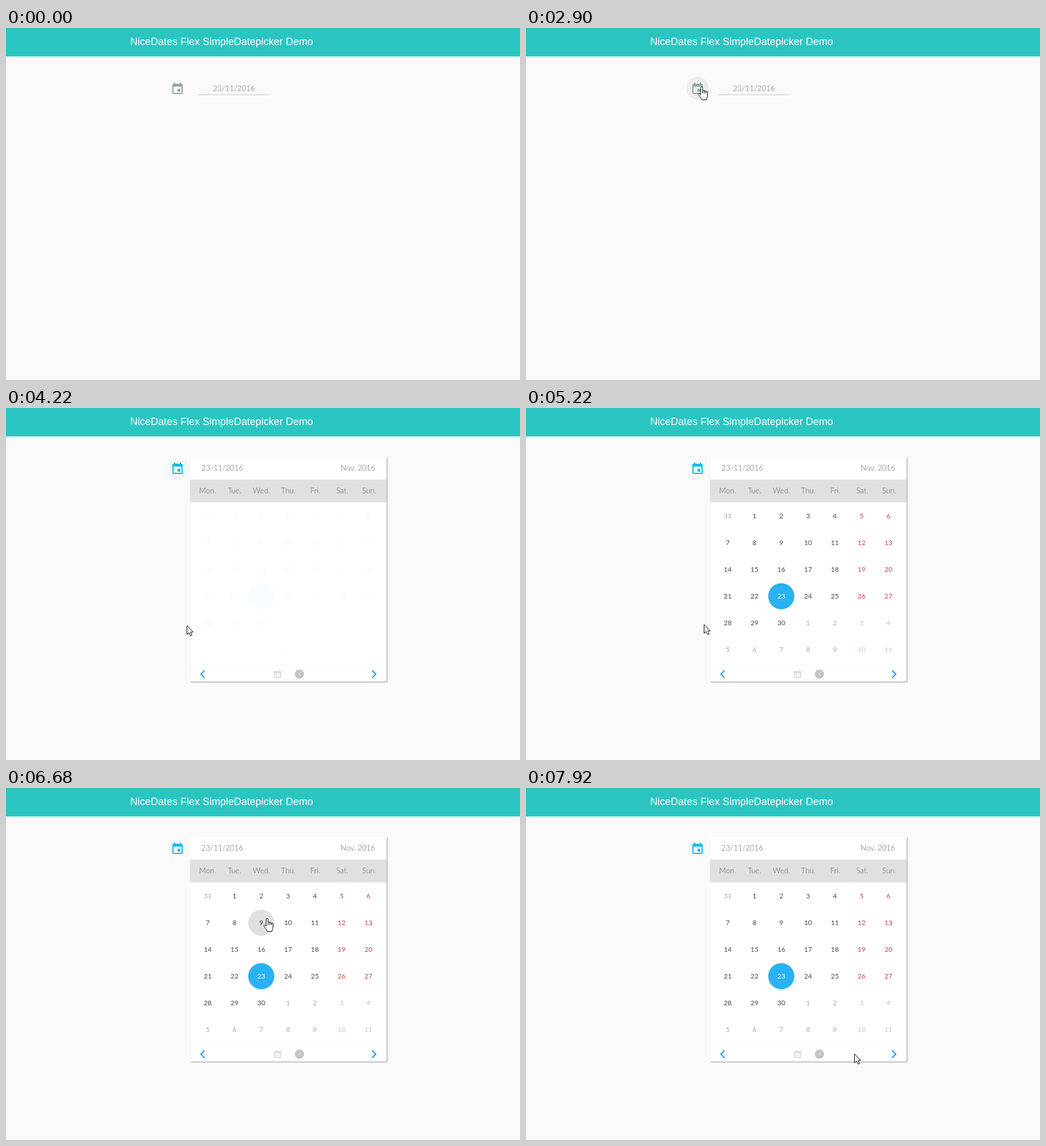
Write an HTML page that moves like this. It is 902 px wide and 619 px high and loops after 8 s.

```html
<!DOCTYPE html>
<html lang="en">
<head>
<meta charset="utf-8">
<title>Datepicker demo</title>
<style>
html, body { margin: 0; width: 100%; height: 100%; overflow: hidden; background: #fafafa; }
body { position: relative; font: 300 13.3px Lato, "Open Sans", sans-serif; color: #666; }
body > * { position: absolute; }
svg { display: block; overflow: visible; }
.bar { left: 0; top: 0; width: 100%; height: 50px; background: #2bc5c1; }
.bar span { position: absolute; left: 218px; top: 14px; font: 18px/20px "Liberation Sans", Arial, sans-serif; color: #fff; white-space: nowrap; }
.field { left: 338px; top: 95px; width: 124px; height: 22px; line-height: 22px; text-align: center; border-bottom: 1px solid #bfc4c4; }
#halo { left: 281px; top: 86px; width: 40px; height: 40px; border-radius: 50%; background: #ededed; }
#event { left: 289px; top: 95px; }
#panel { left: 323px; top: 86px; }
#top, #nav { position: relative; background: #fff; box-shadow: 1px 1px 2px rgba(0, 0, 0, .42); }
#top { overflow: visible; }
.head { display: flex; justify-content: space-between; height: 40px; padding: 0 20px; line-height: 39px; white-space: nowrap; }
.week { display: flex; height: 40px; padding: 0 7px; line-height: 39px; background: #e0e0e0; }
.week span { flex: 1 1 0; text-align: center; }
#days { position: absolute; left: 0; top: 0; }
#days span { position: absolute; width: 46px; height: 46px; border-radius: 50%; text-align: center; font: 400 12px/46px Lato, "Open Sans", sans-serif; color: #454545; }
#days .end { color: #c94542; }
#days .out { color: #a6a6a6; }
#days .out.sat { color: #edb9b9; }
#days .out.sun { color: #c2c2c2; }
#days .over { background: #e0e0e0; }
#days .on { background: #29b2f4; color: #fff; }
#nav { height: 30px; overflow: hidden; }
#nav svg { position: absolute; top: 9px; }
#nav .prev { left: 18px; }
#nav .next { right: 18px; }
#nav .today { left: calc(50% - 26px); }
#nav .clock { left: calc(50% + 11.5px); }
.chevron { fill: none; stroke: #2196f3; stroke-width: 2; }
.pointer { left: 0; top: 0; fill: #fff; stroke: #000; stroke-linejoin: round; }
</style>
</head>
<body>
<div class="bar"><span>NiceDates Flex SimpleDatepicker Demo</span></div>
<div class="field">23/11/2016</div>
<div id="halo"></div>
<svg id="event" width="24" height="24"><path d="M17 12h-5v5h5zM16 1v2H8V1H6v2H5a2 2 0 0 0-2 2v14a2 2 0 0 0 2 2h14a2 2 0 0 0 2-2V5a2 2 0 0 0-2-2h-1V1zm3 18H5V8h14z"/></svg>
<div id="panel">
  <div id="top">
    <div class="head"><span>23/11/2016</span><span>Nov. 2016</span></div>
    <div class="week"><span>Mon.</span><span>Tue.</span><span>Wed.</span><span>Thu.</span><span>Fri.</span><span>Sat.</span><span>Sun.</span></div>
    <div id="days"></div>
  </div>
  <div id="nav">
    <svg class="prev chevron" width="8" height="16"><path d="M7.5 1.5L1 8l6.500 6.500"/></svg>
    <svg class="today" width="13" height="16" fill="none" stroke="#bdbdbd"><path d="M1 3.500h11v10H1zM1 5.500h11M3.500 2v2M9.500 2v2M4 9l2 2 3.500-3.500"/></svg>
    <svg class="clock" width="16" height="16"><circle cx="8" cy="8" r="8" fill="#bdc3c7"/><path d="M10.500 4.500L7.500 8l2 2.500" fill="none" stroke="#fff"/></svg>
    <svg class="next chevron" width="8" height="16"><path d="M.5 1.500L7 8 .5 14.500"/></svg>
  </div>
</div>
<svg id="arrow" class="pointer" width="12" height="19"><path d="M.5.7V16.300L4.200 13l2.600 5.500 2.500-1.100L6.800 12h4.700z"/></svg>
<svg id="hand" class="pointer" width="18" height="24"><path d="M4.500 14V2.200a1.700 1.700 0 0 1 3.400 0V8a1.500 1.500 0 0 1 3 0v.8a1.400 1.400 0 0 1 2.800 0v.9a1.400 1.400 0 0 1 2.800.2V16c0 3-1.700 4-1.700 7.300H6.300C6 20 1.700 17 .7 13.600c-.4-1.700 1.500-2.200 2.500-.9zM7.900 8v4M10.900 8.800V12M13.700 9.700V12"/></svg>
<script>
const LOOP = 8000, OPEN = 3680, CELL = 47, LEFT = 331, TOP = 167;
const el = id => document.getElementById(id);
const clamp = v => Math.max(0, Math.min(1, v));

// Pointer moves: first step, last step, number of steps, evenly timed waypoints.
const moves = [
  [870, 1410, 8, [[701, 600], [520, 440], [380, 330], [324, 294]]],
  [1570, 1650, 2, [[312, 274], [303, 264]]],
  [1970, 1970, 1, [[302, 264]]],
  [2290, 2900, 9, [[310, 250], [333, 200], [328, 150], [310, 115], [308, 103]]],
  [3680, 4450, 11, [[318, 210], [327, 353], [322, 380], [317, 382], [316, 382], [316, 381]]],
  [4840, 4920, 2, [[311, 382], [308, 381]]],
  [5220, 5220, 1, [[312, 380]]],
  [5450, 6210, 11, [[330, 374], [390, 350], [450, 325], [512, 298], [558, 273], [564, 247]]],
  [6310, 6380, 2, [[576, 242], [588, 238]]],
  [6540, 7310, 11, [[545, 236], [458, 229], [384, 228], [352, 215], [358, 180], [381, 140]]],
  [7400, 7920, 8, [[432, 150], [490, 270], [550, 400], [576, 467]]]
];

function along(points, f) {
  const at = f * (points.length - 1), i = Math.min(Math.floor(at), points.length - 2);
  if (i < 0) return points[0];
  return points[i].map((v, axis) => Math.round(v + (points[i + 1][axis] - v) * (at - i)));
}

// Fraction of a stepped move done at time t; steps may land slightly early.
function stepped(t, from, to, steps) {
  if (steps === 1) return 1;
  const k = Math.floor((t - from) / (to - from) * (steps - 1) + 0.2);
  return clamp(k / (steps - 1));
}

function pointerAt(t) {
  const move = moves.filter(m => t >= m[0]).pop();
  if (!move) return null;
  const [from, to, steps, points] = move;
  return along(points, stepped(t, from, to, steps));
}

// The CSS "ease" curve.
function ease(x) {
  let lo = 0, hi = 1, s = 0.5;
  for (let i = 0; i < 24; i++) {
    s = (lo + hi) / 2;
    if (0.75 * s - 0.75 * s * s + s ** 3 < x) lo = s; else hi = s;
  }
  return 0.3 * s * (1 - s) ** 2 + 3 * s * s * (1 - s) + s ** 3;
}

const days = Array.from({ length: 42 }, (_, i) => {
  const day = document.createElement("span"), col = i % 7;
  const number = i === 0 ? 31 : i > 30 ? i - 30 : i;
  day.textContent = number;
  if (col > 4) day.classList.add("end", col === 5 ? "sat" : "sun");
  if (i === 0 || i > 30) day.classList.add("out");
  if (i === 23) day.classList.add("on");
  day.style.left = LEFT - 323 + col * CELL + "px";
  day.style.top = TOP - 86 + Math.floor(i / 7) * CELL + "px";
  el("days").append(day);
  return day;
});

function dayUnder([x, y]) {
  const col = Math.floor((x - LEFT) / CELL), row = Math.floor((y - TOP) / CELL);
  return col >= 0 && col < 7 && row >= 0 && row < 6 ? row * 7 + col : -1;
}

function drawPanel(t) {
  const open = t >= OPEN;
  el("panel").style.display = open ? "block" : "none";
  el("event").style.fill = open ? "#03bdf0" : "#95a5a6";
  if (!open) return;
  const x = clamp(stepped(t, OPEN, 4450, 11) * 770 / 524);
  const p = x < 1 ? ease(x) : 1;
  const width = Math.round(345 * p), height = Math.round(p < 1 ? 390 * p : 395);
  el("top").style.width = Math.max(191, width) + "px";
  el("top").style.height = Math.max(80, height - 30) + "px";
  el("nav").style.width = width + "px";
  el("days").style.opacity = p < 1 ? 0 : clamp((t - 4200) / 490);
}

function drawPointer(t) {
  const at = pointerAt(t);
  const hovered = at && t > 4700 ? dayUnder(at) : -1;
  const onIcon = at && Math.hypot(at[0] - 301, at[1] - 106) < 20;
  const link = hovered >= 0 || onIcon;
  days.forEach((day, i) => day.classList.toggle("over", i === hovered && i !== 23));
  el("arrow").style.display = at && !link ? "block" : "none";
  el("hand").style.display = at && link ? "block" : "none";
  if (!at) return;
  el("arrow").style.transform = `translate(${at[0]}px, ${at[1]}px)`;
  el("hand").style.transform = `translate(${at[0] - 6}px, ${at[1]}px)`;
}

const start = performance.now();
function draw() {
  const t = (performance.now() - start) % LOOP;
  drawPanel(t);
  drawPointer(t);
  el("halo").style.opacity = t < 3900 ? clamp((t - 2750) / 150) : clamp((4400 - t) / 500);
  requestAnimationFrame(draw);
}
draw();
</script>
</body>
</html>
```
